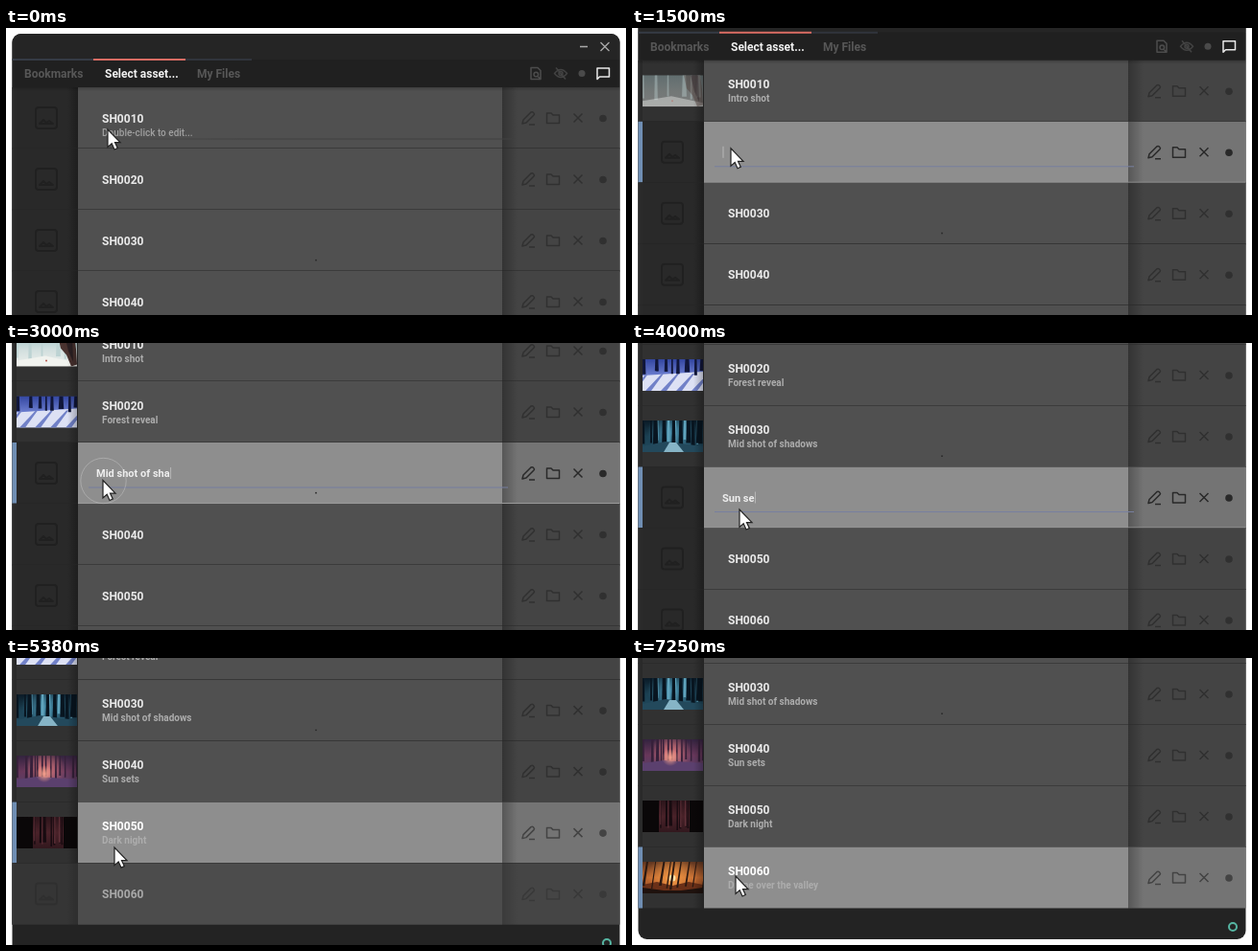
An HTML page with a canvas for the animation above (7370 ms loop, 646 by 300 pixels).

```html
<!DOCTYPE html>
<html lang="en">
<head>
<meta charset="utf-8">
<title>Asset list</title>
<style>
html, body { margin: 0; width: 100%; height: 100%; overflow: hidden; background: #fff; }
canvas { display: block; }
</style>
</head>
<body>
<canvas id="stage" width="646" height="300"></canvas>
<script>
const g = document.getElementById('stage').getContext('2d');
const LOOP = 7370, STEP = 125, TOP = 62, ROW = 64, CHAR = 33, MOVE = 200;

// sel: row is clicked, type: first key, done: edit committed; cx, cy: pointer place in the list
const rows = [
  { text: 'Intro shot', sel: 150, type: 500, done: 1380, cx: 106, cy: 106 },
  { text: 'Forest reveal', sel: 1500, type: 1750, done: 2330, cx: 103, cy: 154 },
  { text: 'Mid shot of shadows', sel: 2450, type: 2500, done: 3160, cx: 101, cy: 229.5 },
  { text: 'Sun sets', sel: 3300, type: 3800, done: 4350, cx: 112, cy: 298.5 },
  { text: 'Dark night', sel: 4500, type: 4700, done: 5000, cx: 113, cy: 365.5 },
  { text: 'Drone over the valley', sel: 5650, type: 5950, done: 6800, cx: 108, cy: 412.5 }
];
const scrollKeys = [[0, 0], [880, 9], [2250, 56], [3000, 86], [4000, 124.5], [5380, 167.5], [6750, 184.5], [LOOP, 184.5]];

const clamp = v => Math.max(0, Math.min(1, v));
const smooth = v => v * v * (3 - 2 * v);

function scrollAt(t) {
  const k = scrollKeys, last = k.length - 1;
  const slope = i => i < 1 || i >= last - 1 ? 0 : (k[i + 1][1] - k[i - 1][1]) / (k[i + 1][0] - k[i - 1][0]);
  let i = 0;
  while (i < last - 1 && t >= k[i + 1][0]) i++;
  const [t0, a] = k[i], [t1, b] = k[i + 1], d = t1 - t0, u = (t - t0) / d, e = smooth(u);
  return a + (b - a) * e + d * (slope(i) * u * (1 - u) ** 2 - slope(i + 1) * u * u * (1 - u));
}

function rect(x, y, w, h, color) { g.fillStyle = color; g.fillRect(x, y, w, h); }

function fade(x0, y0, x1, y1, ...colors) {
  const f = g.createLinearGradient(x0, y0, x1, y1);
  colors.forEach((c, i) => f.addColorStop(i / (colors.length - 1), c));
  return f;
}

function label(s, x, y, size, color, weight = 700) {
  g.font = `${weight} ${size}px Roboto, sans-serif`;
  g.fillStyle = color;
  g.fillText(s, x, y);
}

function disc(x, y, r, color) {
  g.fillStyle = color;
  g.beginPath();
  g.arc(x, y, r, 0, 7);
  g.fill();
}

function ring(x, y, r, color, width) {
  g.strokeStyle = color;
  g.lineWidth = width;
  g.beginPath();
  g.arc(x, y, r, 0, 7);
  g.stroke();
}

function icon(path, x, y, color, width = 1.5) {
  g.save();
  g.translate(x, y);
  g.strokeStyle = color;
  g.lineWidth = width;
  g.lineJoin = 'round';
  g.stroke(new Path2D(path));
  g.restore();
}

const icons = {
  pencil: 'M-6 6L-5 2L3 -6Q5 -7 6 -5Q7 -4 6 -3L-2 5ZM1 7H7',
  folder: 'M-6.5 -5H-2L0 -3H6.5V5.5H-6.5Z',
  cross: 'M-4.5 -4.5L4.5 4.5M4.5 -4.5L-4.5 4.5',
  picture: 'M-8 -11H8Q11 -11 11 -8V8Q11 11 8 11H-8Q-11 11 -11 8V-8Q-11 -11 -8 -11ZM-7 6L-3 2L0 5L3 3L7 6Z',
  page: 'M-5 -6H2L5 -3V6H-5ZM-2 1A2.3 2.3 0 1 0 2.6 1A2.3 2.3 0 1 0 -2 1M2 3L4 5',
  eye: 'M-6.5 0Q0 -8 6.5 0Q0 8 -6.5 0ZM-2 0A2 2 0 1 0 2 0A2 2 0 1 0 -2 0M-5 -6L5 6',
  bubble: 'M-6 -5.5H6.5V3.5H-3.5L-6 6Z'
};

// Upright trunks spread by a seeded generator
function trunks(seed, n, color, base, width, lean = 0) {
  const rnd = () => (seed = seed * 16807 % 2147483647) / 2147483647;
  for (let i = 0; i < n; i++) {
    const x = (i + rnd()) * 63 / n, w = width * (.5 + rnd()), b = base + rnd() * 5;
    blob(color, x + lean, 0, x + lean + w, 0, x + w * 1.2, b, x - w * .2, b);
  }
}

function blob(color, ...p) {
  g.fillStyle = color;
  g.beginPath();
  for (let i = 0; i < p.length; i += 2) g.lineTo(p[i], p[i + 1]);
  g.fill();
}

function glow(x, y, r, color) {
  const f = g.createRadialGradient(x, y, 0, x, y, r);
  f.addColorStop(0, color);
  f.addColorStop(1, color + '00');
  rect(0, 0, 63, 33, f);
}

const sky = (...c) => rect(0, 0, 63, 33, fade(0, 0, 0, 33, ...c));

const scenes = [
  () => {
    sky('#a9c9cc', '#d3e0df', '#eef0ed');
    trunks(31, 6, '#bdd3d3', 22, 2.5);
    blob('#f1f3ef', 0, 27, 30, 22, 63, 29, 63, 33, 0, 33);
    blob('#49322f', 43, 0, 60, 0, 62, 15, 63, 31, 57, 33, 52, 21, 46, 14);
    blob('#2b2023', 50, 0, 58, 0, 59, 28, 54, 17);
    disc(31, 27, 1, '#b65348');
  },
  () => {
    sky('#3346a0', '#6a7cce', '#a3afe3');
    blob('#dde1f4', 0, 17, 63, 13, 63, 33, 0, 33);
    for (let x = 4; x < 80; x += 16) blob('#7181c8', x, 15, x + 2, 15, x - 11, 33, x - 17, 33);
    trunks(87, 9, '#10163a', 12, 3);
  },
  () => {
    sky('#0a1a26', '#1b4052', '#20485c');
    glow(31, 13, 26, '#4a93b0');
    trunks(19, 7, '#60a4bd', 20, 1.6);
    trunks(47, 12, '#081520', 22, 2.8);
    blob('#23495c', 0, 27, 24, 22, 63, 27, 63, 33, 0, 33);
    blob('#86b4c6', 22, 33, 28, 23, 35, 23, 43, 33);
  },
  () => {
    sky('#33233f', '#67375a', '#564069');
    glow(29, 15, 22, '#e8807f');
    trunks(63, 13, '#36203a', 20, 2);
    blob('#5b406e', 0, 25, 22, 22, 63, 25, 63, 33, 0, 33);
    glow(29, 19, 9, '#f4a08c');
  },
  () => {
    sky('#2c151b', '#4a2229', '#32181e');
    trunks(29, 14, '#170b10', 26, 2);
    trunks(71, 8, '#63323a', 24, 1);
    rect(0, 0, 17, 33, '#0a0708');
    rect(49, 0, 14, 33, '#0a0708');
  },
  () => {
    sky('#5e3520', '#c26a31', '#8a421f');
    glow(31, 17, 26, '#f59a45');
    disc(31, 17, 3.5, '#ffe2a6');
    blob('#6a3018', 0, 24, 15, 21, 31, 25, 48, 21, 63, 24, 63, 33, 0, 33);
    trunks(53, 9, '#2a1811', 25, 1.3, 4);
    blob('#1f120e', 0, 27, 22, 30, 40, 30, 63, 27, 63, 33, 0, 33);
  }
];

function thumbnail(i, y, alpha) {
  g.save();
  g.globalAlpha = alpha;
  g.beginPath();
  g.rect(11, y, 63, 33);
  g.clip();
  g.translate(11, y);
  scenes[i]();
  g.restore();
}

function drawRow(r, i, t) {
  const y = TOP + ROW * i, next = rows[i + 1];
  const selected = t >= r.sel && (!next || t < next.sel);
  const done = t >= r.done, editing = selected && !done;
  const hover = !selected && !done && t >= r.sel - 150;
  const ink = editing ? '#292929' : selected ? '#434343' : '#303030';

  rect(6, y, 69, ROW, done ? '#313131' : '#292929');
  if (done) thumbnail(i, y + 15.5, clamp((t - r.done) / 300));
  else icon(icons.picture, 42, y + 32, '#202020', 2);
  rect(64, y, 11, ROW, fade(64, 0, 75, 0, 'rgba(0,0,0,0)', 'rgba(0,0,0,.28)'));
  rect(6, y, 5, ROW, selected ? '#6f8eb3' : '#2a2a2a');

  rect(75, y, 442, ROW, selected ? '#8e8e8e' : '#505050');
  rect(517, y, 123, ROW, selected ? '#747474' : '#444');
  rect(517, y, 16, ROW, fade(517, 0, 533, 0, 'rgba(0,0,0,.25)', 'rgba(0,0,0,0)'));
  if (i < 5) rect(6, y + ROW - .5, 634, 1, '#262626');
  if (editing) rect(75, y + ROW - 1, 565, 1, '#9a9a9a');

  icon(icons.pencil, 544, y + 32, ink);
  icon(icons.folder, 570, y + 32, ink);
  icon(icons.cross, 596, y + 32, ink);
  disc(622, y + 32.5, 3.8, ink);

  if (editing) {
    const typed = r.text.slice(0, Math.max(0, Math.floor((t - r.type) / CHAR)));
    label(typed, 94, y + 36, 11, '#eee');
    rect(94.5 + g.measureText(typed).width, y + 26, 1, 12, '#b8b8b8');
    rect(86, y + 46.5, 437, 1, '#777f9f');
  } else {
    label('SH00' + (i + 1) + '0', 100, y + (done ? 29.5 : 36.5), 12, selected ? '#fff' : '#e9e9e9');
    if (done) label(r.text, 100, y + 43.7, 10, '#adadad');
    if (hover) {
      label('Double-click to edit...', 100, y + 50.7, 10, '#a0a0a0', 500);
      rect(100, y + 53.5, 427, 1, fade(100, 0, 260, 0, 'rgba(56,56,56,0)', '#404040'));
    }
  }
  if (i === 5 && t >= 5130 && t < 5500) rect(6, y, 634, ROW, 'rgba(70,70,70,.4)');
}

function drawHeader() {
  rect(6, 6, 634, 27, '#252525');
  rect(6, 33, 634, 29, '#202020');
  rect(6, 32, 85, 2, '#353b45');
  rect(91, 32, 96, 2, '#d96c63');
  rect(187, 32, 69, 2, '#30343c');
  label('Bookmarks', 19, 52, 12, '#575757');
  label('Select asset...', 103, 52, 12, '#f0f0f0');
  label('My Files', 199, 52, 12, '#575757');
  icon('M-4 0H4', 602, 19.5, '#aaa');
  icon(icons.cross, 624, 19.5, '#aaa', 1.3);
  icon(icons.page, 552, 47.5, '#4c4c4c');
  icon(icons.eye, 578, 47.5, '#424242');
  disc(600, 47.5, 3.5, '#4a4a4a');
  icon(icons.bubble, 622, 47.5, '#e8e8e8');
}

function drawPointer(t) {
  let { cx: x, cy: y } = rows[0];
  for (const r of rows.slice(1)) {
    const e = smooth(clamp((t - r.sel + MOVE) / MOVE));
    x += (r.cx - x) * e;
    y += (r.cy - y) * e;
  }
  for (const r of rows) {
    const p = (t - r.sel) / 650;
    if (p > 0 && p < 1) ring(r.cx + .5, r.cy + .5, 28 * p, 'rgba(210,210,210,.4)', 1);
  }
  g.save();
  g.translate(x, y);
  const arrow = new Path2D('M0 0V18.5L4.2 14.8L7 21L10.3 19.5L7.5 13.6H13Z');
  g.fillStyle = '#fff';
  g.strokeStyle = '#222';
  g.lineWidth = 1.2;
  g.fill(arrow);
  g.stroke(arrow);
  g.restore();
}

function draw(t) {
  rect(0, 0, 646, 300, '#fff');
  g.save();
  g.translate(0, -scrollAt(t));
  g.save();
  g.beginPath();
  g.roundRect(6.5, 6, 633, 472.5, 9);
  g.clip();
  rect(6, 6, 634, 473, '#232323');
  drawHeader();
  rows.forEach((r, i) => drawRow(r, i, t));
  rect(6, TOP, 634, 4, fade(0, TOP, 0, TOP + 4, 'rgba(0,0,0,.2)', 'rgba(0,0,0,0)'));
  disc(323, 242.7, .9, '#292929');
  ring(626, 465.5, 4, '#55b5a2', 2);
  g.restore();
  drawPointer(t);
  g.restore();
}

const start = performance.now();
function tick() {
  const t = (performance.now() - start) % LOOP;
  draw(Math.min(58, Math.floor((t + 3) / STEP)) * STEP);
  requestAnimationFrame(tick);
}
tick();
</script>
</body>
</html>
```
